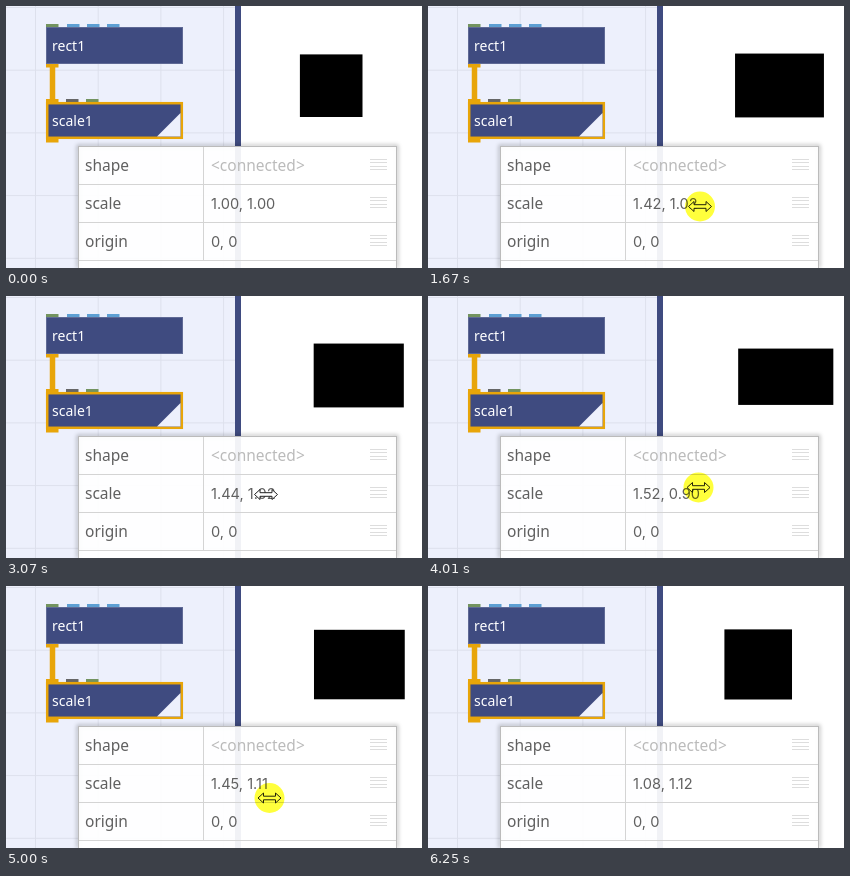
Write an HTML page that moves like this. It is 416 by 262 pixels and loops after 6.95 s.

```html
<!DOCTYPE html>
<html lang="en">
<head>
<meta charset="utf-8">
<title>Scale node</title>
<style>
  html, body { margin: 0; width: 100%; height: 100%; overflow: hidden; background: #fff; }
  svg { display: block; width: 416px; height: 262px; }
  text { font: 15.5px "Noto Sans", sans-serif; fill: #606060; }
  .node { font-size: 14px; font-weight: 500; fill: #fff; }
  .number { font: 14.6px Inter, sans-serif; }
  .hint { fill: #bbb; }
  #halo { mix-blend-mode: multiply; }
</style>
</head>
<body>
<svg viewBox="0 0 416 262">
  <defs>
    <pattern id="grid" x="29" y="1" width="62.7" height="62.7" patternUnits="userSpaceOnUse">
      <path d="M.5 0V63M0 .5H63" stroke="#dde0ec"/>
    </pattern>
    <filter id="shadow" x="-5%" y="-10%" width="110%" height="120%">
      <feGaussianBlur stdDeviation="2"/>
    </filter>
  </defs>

  <rect width="416" height="262" fill="#fff"/>
  <rect width="229" height="262" fill="#edf0fc"/>
  <rect width="229" height="262" fill="url(#grid)"/>
  <rect x="229" width="6" height="262" fill="#3f4b80"/>
  <rect id="shape"/>

  <g id="ports"></g>
  <rect x="40.5" y="21.5" width="136" height="36" fill="#3f4b80" stroke="#5f6995"/>
  <path d="M46.5 58V96" stroke="#e8a509" stroke-width="5.5"/>
  <rect x="41.2" y="97.2" width="134.6" height="34.6" fill="#3f4b80" stroke="#e8a509" stroke-width="2.5"/>
  <path d="M151 130.5L174.5 107V130.5Z" fill="#edf0fc"/>
  <text class="node" x="46" y="45">rect1</text>
  <text class="node" x="46" y="120">scale1</text>

  <path d="M72 262V140H391V262" fill="none" stroke="#000" stroke-opacity=".35" stroke-width="2" filter="url(#shadow)"/>
  <rect x="72.5" y="140.5" width="318" height="130" fill="#fff" fill-opacity=".93" stroke="#bbb"/>
  <path d="M73 178.5H390M73 216.5H390M73 254.5H390M197.5 141V254" stroke="#d4d4d4"/>
  <g id="handles" stroke="#ddd"></g>
  <text x="79" y="165">shape</text>
  <text x="79" y="203">scale</text>
  <text x="79" y="241">origin</text>
  <text class="hint" x="205" y="165">&lt;connected&gt;</text>
  <text class="number" id="value" x="205" y="203"></text>
  <text class="number" x="205" y="241">0, 0</text>

  <g id="pointer">
    <path d="M-11.5 0L-6 -5V-1.8H6V-5L11.5 0L6 5V1.8H-6V5Z" fill="#fff" stroke="#222"/>
  </g>
  <circle id="halo" r="15" fill="#ffff3c"/>
</svg>
<script>
const LOOP = 6950, START = 200, TICK = 77;
const HIDDEN = 0, HOVER = 1, DRAG = 2;

// tick, pointer x, pointer y, scale x, scale y, pointer mode
const keys = [
  [-9, 318, 255, 1, 1, HIDDEN],
  [0, 318, 255, 1, 1, HOVER],
  [8, 218, 201, 1, 1, HOVER],
  [9, 219, 199, 1, 1, HOVER],
  [10, 219, 199, 1, 1, DRAG],
  [18, 271, 200, 1.41, 1.02, DRAG],
  [19, 272, 200.5, 1.42, 1.02, DRAG],
  [21, 272, 200, 1.42, 1.02, HOVER],
  [22, 272, 200, 1.42, 1.02, HOVER],
  [25, 258, 200, 1.42, 1.02, HOVER],
  [27, 258, 200, 1.42, 1.02, DRAG],
  [31, 288, 202, 1.7, 1.05, DRAG],
  [33, 288, 202, 1.7, 1.05, DRAG],
  [36, 260, 199, 1.44, 1.02, DRAG],
  [37, 260, 198.5, 1.44, 1.02, HOVER],
  [38, 260, 198.5, 1.44, 1.02, HOVER],
  [39, 262, 200, 1.44, 1.02, HOVER],
  [41, 262, 200, 1.44, 1.02, DRAG],
  [45, 274, 197, 1.55, .96, DRAG],
  [49, 270.5, 191.5, 1.52, .9, DRAG],
  [50, 269, 193, 1.5, .92, DRAG],
  [53, 269, 208, 1.5, 1.07, DRAG],
  [54, 269, 208, 1.5, 1.07, DRAG],
  [62, 263.5, 212, 1.45, 1.11, DRAG],
  [63, 263.5, 212, 1.45, 1.11, DRAG],
  [72, 213, 210, 1.08, 1.12, DRAG],
  [74, 213, 210, 1.08, 1.12, DRAG],
  [75, 213, 209, 1.08, 1.12, HOVER],
  [77, 326, 255, 1.08, 1.12, HOVER],
  [78, 326, 255, 1.08, 1.12, HIDDEN],
  [99, 326, 255, 1.08, 1.12, HIDDEN]
];

const el = id => document.getElementById(id);
const setAttrs = (node, attrs) => {
  for (const name in attrs) node.setAttribute(name, attrs[name]);
};

const ports = [
  [40, 18, "#73935f"], [61, 18, "#5d9fd3"], [81, 18, "#5d9fd3"], [101, 18, "#5d9fd3"],
  [40, 58, "#e8a509"], [40, 93, "#e8a509"], [60, 93, "#666"], [80, 93, "#73935f"],
  [40, 133, "#e8a509"]
];
el("ports").innerHTML = ports.map(([x, y, color]) =>
  `<rect x="${x}" y="${y}" width="12.5" height="3.5" fill="${color}"/>`).join("");

el("handles").innerHTML = [0, 1, 2].map(row => {
  const y = 153.5 + row * 38;
  return `<path d="${[0, 3, 7, 10].map(dy => `M364 ${y + dy}H381`).join("")}"/>`;
}).join("");

function poseAt(tick) {
  const next = keys.findIndex(key => key[0] > tick);
  const a = keys[next - 1], b = keys[next];
  const p = (tick - a[0]) / (b[0] - a[0]);
  const [x, y, sx, sy] = [1, 2, 3, 4].map(i => a[i] + (b[i] - a[i]) * p);
  return { x, y, sx, sy, mode: a[5] };
}

function draw(ms) {
  const { x, y, sx, sy, mode } = poseAt(Math.floor((ms % LOOP - START) / TICK));
  setAttrs(el("shape"), {
    x: 262.6 + 31.3 * sx, y: 90.2 - 41.8 * sy,
    width: 62.6 * sx, height: 62.6 * sy
  });
  el("value").textContent = `${sx.toFixed(2)}, ${sy.toFixed(2)}`;
  setAttrs(el("pointer"), {
    transform: `translate(${x} ${y})`,
    visibility: mode === HIDDEN ? "hidden" : "visible"
  });
  setAttrs(el("halo"), { cx: x, cy: y, visibility: mode === DRAG ? "visible" : "hidden" });
}

const begin = performance.now();
function frame() {
  draw(performance.now() - begin);
  requestAnimationFrame(frame);
}
frame();
</script>
</body>
</html>
```
